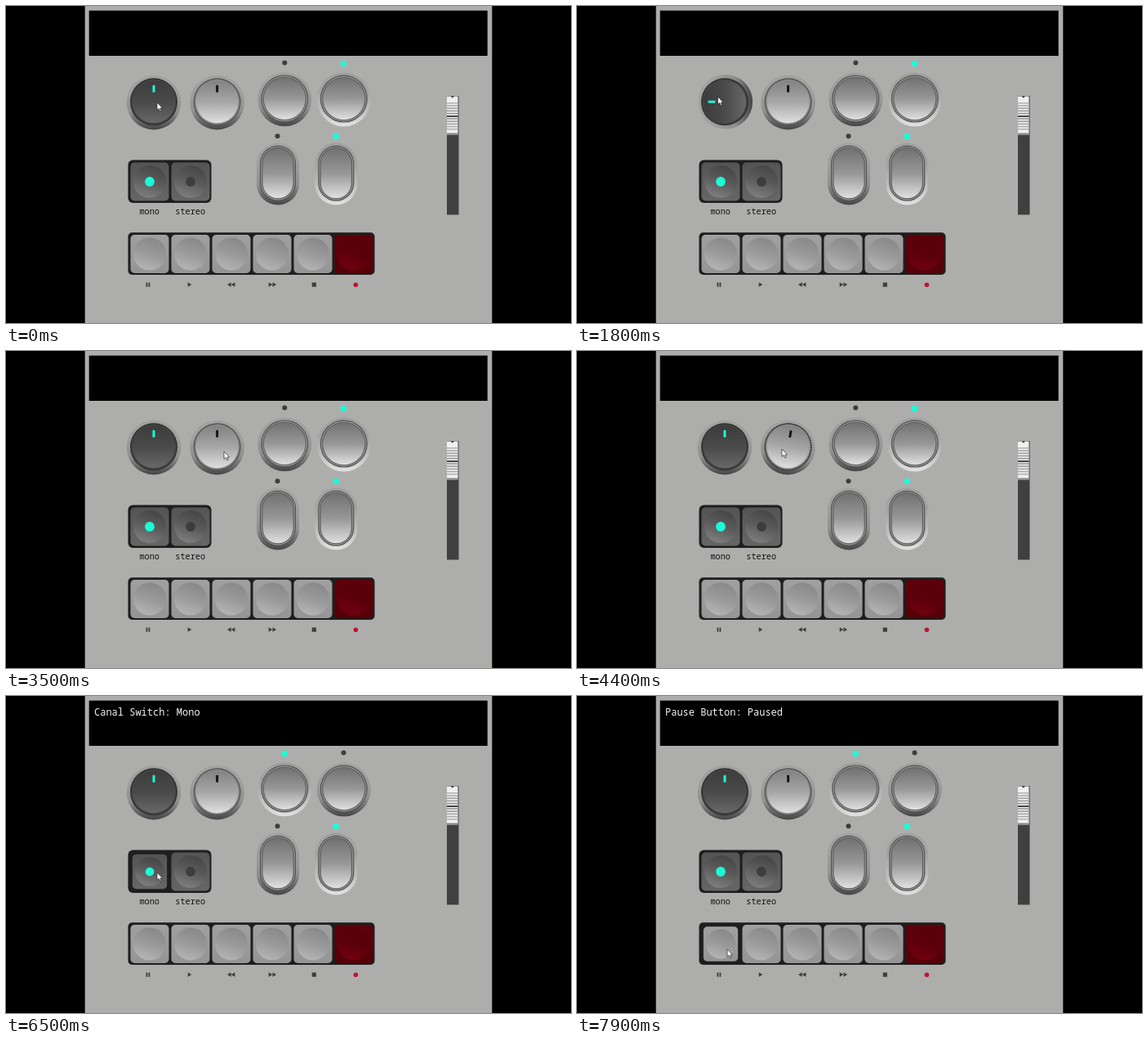
Recreate the animation shown at these times as an HTML page. Size 692x388 px, loop 8000 ms.

```html
<!DOCTYPE html>
<html lang="en">
<head>
<meta charset="utf-8">
<title>Audio panel</title>
<style>
  html, body { margin: 0; width: 100%; height: 100%; overflow: hidden; background: #000; }
  svg { display: block; width: 100vw; height: 100vh; }
  text { font-family: "Noto Sans Mono", "DejaVu Sans Mono", monospace; font-weight: 500; white-space: pre; }
</style>
</head>
<body>
<svg id="stage" viewBox="0 0 692 388"></svg>
<script>
const LOOP = 8000, STEP = 100;
const CYAN = '#1cfad6', DARK = '#3c3d3c', FRAME = '#1d1e1d';
const stage = document.getElementById('stage');

function add(parent, tag, attrs = {}, text) {
  const node = document.createElementNS('http://www.w3.org/2000/svg', tag);
  for (const key in attrs) node.setAttribute(key, attrs[key]);
  if (text) node.textContent = text;
  parent.append(node);
  return node;
}
const circle = (parent, cx, cy, r, fill, more) => add(parent, 'circle', { cx, cy, r, fill, ...more });
const rect = (parent, x, y, width, height, fill, rx = 0) =>
  add(parent, 'rect', { x, y, width, height, fill, rx });
const path = (parent, d, fill, more) => add(parent, 'path', { d, fill, ...more });

const defs = add(stage, 'defs');
function gradient(id, colors, x1 = 0, x2 = 0) {
  const node = add(defs, 'linearGradient', { id, x1, y1: 0, x2, y2: 1 });
  colors.forEach((color, i) =>
    add(node, 'stop', { offset: i / (colors.length - 1), 'stop-color': color }));
}
gradient('shade', ['#a2a3a1', '#9e9f9d', '#8f908e', '#454545']);
gradient('glow', ['#9fa09e', '#a3a4a2', '#bbbcba', '#e2e2e1']);
gradient('darkFace', ['#3c3c3c', '#4a4a4a', '#686868']);
gradient('lightFace', ['#828282', '#a6a6a6', '#e0e0e0']);
gradient('switchFace', ['#727272', '#979797', '#e0e0e0']);
gradient('darkKey', ['#545454', '#666']);
gradient('darkDish', ['#454545', '#5c5c5c', '#808080'], 0.65, 0.3);
gradient('key', ['#a0a0a0', '#959595']);
gradient('dish', ['#888', '#9a9a9a', '#b6b6b6'], 0.65, 0.3);
gradient('redKey', ['#5e0009', '#540007']);
gradient('redDish', ['#560008', '#5b000a', '#73000e'], 0.65, 0.3);

// Case and display
rect(stage, 96.7, 0, 498.6, 388, '#adaeac');
rect(stage, 101.7, 5.6, 488, 55.4, '#000');
const display = add(stage, 'text', { x: 108, y: 24, 'font-size': 12, fill: '#f4f4f4' });

function knob(cx, cy, rim, bevel, face, mark) {
  const g = add(stage, 'g');
  circle(g, cx, cy + 0.8, 33.3, 'url(#shade)');
  circle(g, cx, cy, 29, rim);
  circle(g, cx, cy, 27.5, bevel);
  circle(g, cx, cy, 26, `url(#${face})`);
  rect(g, cx - 1.5, cy - 20.5, 3, 9, mark, 1);
  const focus = circle(g, cx, cy, 28.5, 'none',
    { stroke: '#222', 'stroke-dasharray': '1.5 1.5' });
  return {
    turn: angle => g.setAttribute('transform', `rotate(${angle} ${cx} ${cy})`),
    focus: on => focus.setAttribute('opacity', +on)
  };
}
const volume = knob(181, 117.3, '#323232', '#454545', 'darkFace', CYAN);
const balance = knob(258.6, 117.3, '#565656', '#8b8b8b', 'lightFace', '#161616');

function toggle(cx, cy, w, h, ledX, ledY) {
  const pill = (grow, dy, fill) => rect(stage, cx - w / 2 - grow, cy - h / 2 - grow + dy,
    w + 2 * grow, h + 2 * grow, fill, w / 2 + grow);
  const halo = pill(4, 0.8, '#999');
  ['#505050', '#969696', '#5d5d5d', 'url(#switchFace)']
    .forEach((fill, i) => pill(-1.15 * i, 0, fill));
  const led = circle(stage, ledX, ledY, 3);
  return on => {
    halo.setAttribute('fill', on ? 'url(#glow)' : 'url(#shade)');
    led.setAttribute('fill', on ? CYAN : DARK);
    led.setAttribute('r', on ? 3.7 : 3);
    led.setAttribute('cy', ledY + on);
  };
}
const roundA = toggle(341.3, 113.4, 58, 58, 341.3, 69.5);
const roundB = toggle(413.8, 113.6, 58, 58, 413.5, 69.5);
toggle(333, 204.8, 44, 68, 332.5, 159.2)(false);
toggle(404.3, 204.8, 44, 68, 404.2, 158.5)(true);

function key(x, y, face, dish) {
  const g = add(stage, 'g'), cx = x + 23.5, cy = y + 23.5;
  rect(g, x, y, 47, 47, `url(#${face})`, 5);
  circle(g, cx, cy, 20, `url(#${dish})`);
  return {
    g, cx, cy,
    press: down => g.setAttribute('transform',
      `translate(${cx} ${cy}) scale(${down ? 0.9 : 1}) translate(${-cx} ${-cy})`)
  };
}

// Channel keys
rect(stage, 149.5, 188.6, 102, 52.3, FRAME, 6);
function channel(x, label) {
  const k = key(x, 191.5, 'darkKey', 'darkDish');
  const led = circle(k.g, k.cx, k.cy, 5.9);
  add(stage, 'text',
    { x: k.cx - 0.3, y: 255, 'font-size': 10.2, fill: '#111', 'text-anchor': 'middle' }, label);
  k.light = on => led.setAttribute('fill', on ? CYAN : DARK);
  return k;
}
const mono = channel(152.5, 'mono');
const stereo = channel(202.5, 'stereo');

// Transport keys
rect(stage, 149.5, 277.3, 302, 51.7, FRAME, 5);
const [pause] = Array.from({ length: 6 }, (_, i) =>
  i < 5 ? key(152.5 + 50 * i, 280, 'key', 'dish') : key(402.5, 280, 'redKey', 'redDish'));

const bar = (x, width) => rect(stage, x, 338.5, width, 5.2, DARK);
const triangle = (x, dir) => path(stage, `M${x} 338.3l${4.6 * dir} 2.7l${-4.6 * dir} 2.7Z`, DARK);
bar(171.5, 1.8);
bar(174.5, 1.8);
triangle(222.7, 1);
for (const shift of [0, 4.8]) {
  triangle(275.6 + shift, -1);
  triangle(321.7 + shift, 1);
}
bar(374.7, 5.2);
circle(stage, 428.4, 341.2, 2.8, '#bd1530');

// Fader: ridges mirrored around the centre line of the cap
rect(stage, 540, 110, 14.5, 145.5, '#3f403f');
rect(stage, 540, 110.5, 13.5, 47, '#f0f0f0');
for (let i = 1; i <= 5; i++) {
  for (const side of [-1, 1]) {
    rect(stage, 540, 134 + side * i * 3.2, 13.5, 1.6, `hsl(0 0% ${55 + i * 3}%)`);
  }
}
rect(stage, 540, 134, 13.5, 2, '#444');
rect(stage, 540, 155.5, 13.5, 2, '#888');
path(stage, 'M544.5 110.5h4.5l-2.2 2Z', '#222');

const cursor = path(stage, 'M0 0V9.3L2.2 7.4L3.7 10.7L5.2 10L3.8 6.9H6.6Z', '#fff',
  { stroke: '#222', 'stroke-width': 0.7 });

// Key points are [time, ...values], joined by straight lines
function tween(points, t) {
  const i = points.findLastIndex(point => point[0] <= t);
  const [t0, ...from] = points[i], [t1, ...to] = points[i + 1] ?? [LOOP, ...from];
  const k = (t - t0) / (t1 - t0);
  return from.map((value, j) => value + (to[j] - value) * k);
}
const pointer = [
  [0, 185, 118], [200, 177, 111], [1100, 172, 110], [2400, 173, 112], [2800, 173, 112],
  [3500, 267, 123], [4400, 251, 120], [5100, 341, 116], [5500, 413, 117], [6200, 185, 216],
  [6700, 185, 216], [7000, 228, 216], [7300, 184, 216], [7600, 184, 310]
];
const volumeSwing = [[0, 0], [500, 0], [1100, 120], [1800, 280], [2400, 60], [2900, 0]];
const balanceSwing = [[0, 0], [3700, 0], [3900, 40], [4100, 40], [4500, 0]];
const DETENT = 30;

const messages = [
  [0, ''], [5200, 'Round Switch: On'], [5500, 'Round Switch: Off'], [6300, 'Canal Switch: Mono'],
  [7000, 'Canal Switch: Stereo'], [7300, 'Canal Switch: Mono'], [7700, 'Pause Button: Paused']
];
const within = (t, from, to) => t >= from && t < to;

function draw(now) {
  const t = Math.floor((now % LOOP) / STEP) * STEP;
  const isStereo = within(t, 7000, 7300);
  volume.turn(Math.round(tween(volumeSwing, t)[0] / DETENT) * DETENT);
  balance.turn(tween(balanceSwing, t)[0]);
  volume.focus(false);
  balance.focus(within(t, 3800, 4700));
  roundA(t >= 5200);
  roundB(t < 5500);
  mono.light(!isStereo);
  stereo.light(isStereo);
  mono.press(within(t, 6300, 6700) || within(t, 7300, 7500));
  stereo.press(within(t, 7000, 7200));
  pause.press(t >= 7700);
  display.textContent = messages.findLast(([time]) => time <= t)[1];
  cursor.setAttribute('transform', `translate(${tween(pointer, t)})`);
}

const start = performance.now();
function tick() {
  draw(performance.now() - start);
  requestAnimationFrame(tick);
}
tick();
</script>
</body>
</html>
```
